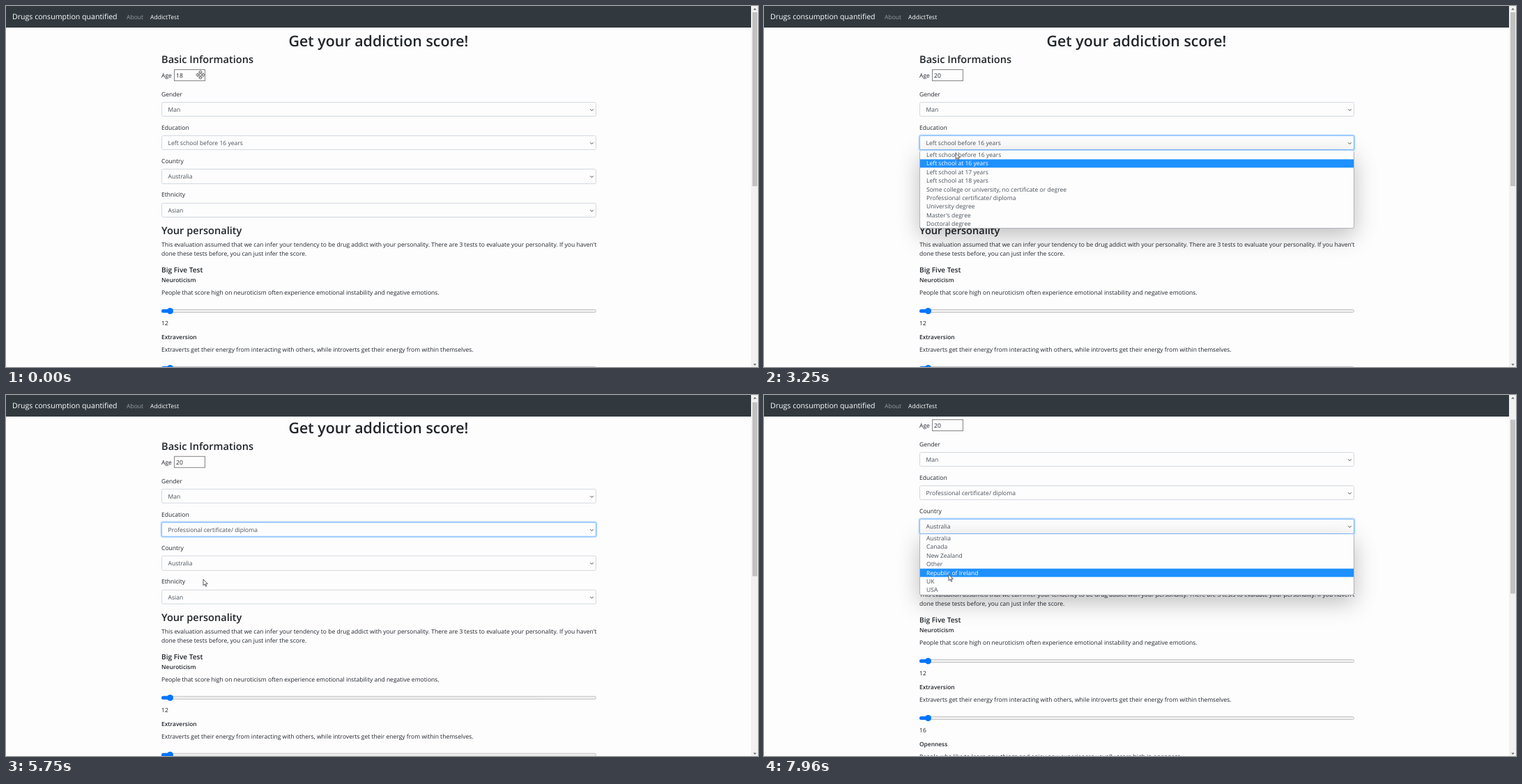
Write an HTML page that moves like this. It is 1079 px wide and 519 px high and loops after 8 s.

```html
<!DOCTYPE html>
<html lang="en">
<head>
<meta charset="utf-8">
<title>Addiction score</title>
<style>
@property --row { syntax: "<integer>"; inherits: true; initial-value: 0; }
html, body { margin: 0; width: 100%; height: 100%; overflow: hidden; }
body {
  position: relative; background: #fdfdfe; color: #212529;
  font: 8.55px/14px "Open Sans", "Noto Sans", sans-serif;
  text-rendering: geometricPrecision;
}
body *, body *::before, body *::after { position: absolute; box-sizing: border-box; white-space: pre; }

/* every animation shares one 8 s clock */
.anim { animation: 8s step-end infinite; }
#page { inset: 0; animation-name: scroll; }
#page > p { left: 223px; margin: -7px 0 0; }
#page > h1, #page > h2, #page > h3, #page > h4 { left: 223px; margin: -15px 0 0; line-height: 30px; font-weight: 600; }
#page > h1 { left: 0; width: 1069px; text-align: center; font-size: 21.4px; }
#page > h2 { font-size: 14.6px; }
#page > h3 { font-size: 10.1px; }
#page > h4 { font-size: 8.4px; }

#nav { left: 0; top: 0; width: 1069px; height: 30.5px; background: #31393f; color: #fff; }
#nav span { top: 8.5px; }
#nav .brand { left: 9px; font-size: 10.6px; }

#age { left: 241px; top: 91px; width: 45px; height: 17px; border: 1px solid #858585; background: #fdfdfe; }
#age span { left: 2px; top: .5px; }
.select { left: 223px; width: 624px; height: 21.5px; margin-top: -10.5px; border: 1px solid #d3d8dd; border-radius: 2.5px; background: #fdfdfe; color: #495057; }
.select span { left: 8.5px; top: 3px; }
.select svg { right: 2.5px; top: 8px; }
.slider { left: 223px; width: 624px; height: 5px; margin-top: -2.5px; border: 1px solid #c2c2c2; border-radius: 3px; background: #efefef; }
.slider::before { left: -1px; top: -1px; width: 12px; height: 5px; border-radius: 3px; background: #0075ff; content: ""; }
.slider::after { left: 6.5px; top: -3px; width: 9px; height: 9px; border-radius: 50%; background: #0075ff; content: ""; }

.list { left: 223px; width: 624px; border: 1px solid #b0b3b7; border-top: 0; border-radius: 3px; opacity: 0; box-shadow: 0 10px 32px rgba(0,0,0,.25); color: #495057; }
.rows { inset: 0; overflow: hidden; border-radius: 2px; background: #fdfdfe; line-height: 12.4px; }
.rows div { left: 9px; }
.rows .bar { left: 0; width: 100%; height: 12.4px; overflow: hidden; background: #1e90ff; color: #fff; transform: translateY(calc(var(--row) * 12.4px)); }
.bar > span { left: 0; top: 0; width: 100%; transform: translateY(calc(var(--row) * -12.4px)); }
#degrees { top: 208px; height: 111.5px; animation-name: showDegrees, rowDegrees; }
#degrees .rows { animation-name: paintDegrees; }
#lands { top: 200px; height: 87.5px; animation-name: showLands, rowLands; }
#lands .rows { animation-name: paintLands; }

#track { left: 1069px; top: 0; width: 10px; height: 519px; background: #f1f1f1; }
#thumb { left: 2px; top: 9px; width: 7px; height: 250px; background: #c1c1c1; animation-name: thumb; }
#track svg { left: 1px; top: 0; }
#cross { left: 272px; top: 92px; animation-name: cross; }
#arrow { left: 0; top: 0; overflow: visible; animation-name: arrow, showArrow; animation-timing-function: ease-in-out, step-end; }

#a18 { animation-name: a18; } #a19 { animation-name: a19; } #a20 { animation-name: a20; }
#before { animation-name: before; } #after { animation-name: after; }
#edu { animation-name: focusEdu; } #country { animation-name: focusCountry; }

@keyframes a18 { 0% { opacity: 1 } 13%, 100% { opacity: 0 } }
@keyframes a19 { 0% { opacity: 0 } 13% { opacity: 1 } 18.25%, 100% { opacity: 0 } }
@keyframes a20 { 0% { opacity: 0 } 18.25%, 100% { opacity: 1 } }
@keyframes before { 0% { opacity: 1 } 59.4%, 100% { opacity: 0 } }
@keyframes after { 0% { opacity: 0 } 59.4%, 100% { opacity: 1 } }
@keyframes focusEdu {
  0% { border-color: #d3d8dd; box-shadow: 0 0 0 2px rgba(0,123,255,0) }
  34.3% { border-color: #b9c0e2; box-shadow: 0 0 0 2px rgba(0,123,255,.03) }
  36%, 81% { border-color: #80bdff; box-shadow: 0 0 0 1.5px rgba(0,123,255,.25) }
  81.5%, 100% { border-color: #d3d8dd; box-shadow: 0 0 0 2px rgba(0,123,255,0) }
}
@keyframes focusCountry {
  0% { border-color: #d3d8dd; box-shadow: 0 0 0 2px rgba(0,123,255,0) }
  81.5%, 100% { border-color: #80bdff; box-shadow: 0 0 0 1.5px rgba(0,123,255,.25) }
}
@keyframes showDegrees { 0% { opacity: 0 } 34.3% { opacity: 1 } 59.4%, 100% { opacity: 0 } }
@keyframes paintDegrees { 0% { opacity: 0 } 36%, 100% { opacity: 1 } }
@keyframes rowDegrees {
  0% { --row: 0 } 40.5% { --row: 1 } 42% { --row: 2 } 43.5% { --row: 3 }
  45.5% { --row: 4 } 47.4%, 100% { --row: 5 }
}
@keyframes showLands { 0% { opacity: 0 } 81.5%, 100% { opacity: 1 } }
@keyframes paintLands { 0% { opacity: 0 } 82.5%, 100% { opacity: 1 } }
@keyframes rowLands {
  0% { --row: 0 } 84.5% { --row: 1 } 85.7% { --row: 2 } 86.8% { --row: 3 } 94%, 100% { --row: 4 }
}
@keyframes scroll {
  0% { transform: none }
  71.5% { transform: none; animation-timing-function: ease-in-out }
  73.8%, 100% { transform: translateY(-56px) }
}
@keyframes thumb {
  0% { transform: none }
  71.5% { transform: none; animation-timing-function: ease-in-out }
  73.8%, 100% { transform: translateY(26.5px) }
}
@keyframes cross { 0% { opacity: 1 } 20.9%, 100% { opacity: 0 } }
@keyframes showArrow { 0% { opacity: 0 } 20.9%, 100% { opacity: 1 } }
@keyframes arrow {
  0%, 20.9% { transform: translate(279px, 97px) }
  25%, 27.2% { transform: translate(275px, 187px) }
  32%, 37.5% { transform: translate(273px, 193px) }
  47.4%, 50% { transform: translate(283px, 280.5px) }
  57%, 70.4% { transform: translate(284.5px, 274px) }
  77%, 82% { transform: translate(270px, 187px) }
  87%, 91.2% { transform: translate(268px, 235px) }
  97%, 100% { transform: translate(265px, 258px) }
}
</style>
</head>
<body>
<div id="page" class="anim">
  <h1 style="top:50.6px">Get your addiction score!</h1>
  <h2 style="top:77.4px">Basic Informations</h2>
  <p style="top:99.5px">Age</p>
  <div id="age"><span id="a18" class="anim">18</span><span id="a19" class="anim">19</span><span id="a20" class="anim">20</span></div>
  <p style="top:126.5px">Gender</p>
  <div class="select" style="top:148px"><span>Man</span></div>
  <p style="top:174.7px">Education</p>
  <div class="select anim" id="edu" style="top:196.3px"><span id="before" class="anim">Left school before 16 years</span><span id="after" class="anim">Professional certificate/ diploma</span></div>
  <p style="top:223px">Country</p>
  <div class="select anim" id="country" style="top:244.7px"><span>Australia</span></div>
  <p style="top:271.3px">Ethnicity</p>
  <div class="select" style="top:293px"><span>Asian</span></div>
  <h2 style="top:323px">Your personality</h2>
  <p style="top:342.7px">This evaluation assumed that we can infer your tendency to be drug addict with your personality. There are 3 tests to evaluate your personality. If you haven't</p>
  <p style="top:356.3px">done these tests before, you can just infer the score.</p>
  <h3 style="top:379px">Big Five Test</h3>
  <h4 style="top:395.3px">Neuroticism</h4>
  <p style="top:411.7px">People that score high on neuroticism often experience emotional instability and negative emotions.</p>
  <div class="slider" style="top:438px"></div>
  <p style="top:455.5px">12</p>
  <h4 style="top:477px">Extraversion</h4>
  <p style="top:493.7px">Extraverts get their energy from interacting with others, while introverts get their energy from within themselves.</p>
  <div class="slider" style="top:520px"></div>
  <p style="top:537.5px">16</p>
  <h4 style="top:559px">Openness</h4>
  <p style="top:575.5px">People who like to learn new things and enjoy new experiences usually score high in openness.</p>
</div>

<div id="degrees" class="list anim" data-rows="Left school before 16 years|Left school at 16 years|Left school at 17 years|Left school at 18 years|Some college or university, no certificate or degree|Professional certificate/ diploma|University degree|Master's degree|Doctoral degree"></div>
<div id="lands" class="list anim" data-rows="Australia|Canada|New Zealand|Other|Republic of Ireland|UK|USA"></div>

<div id="nav">
  <span class="brand">Drugs consumption quantified</span>
  <span style="left:173px;color:#989c9f">About</span>
  <span style="left:207px">AddictTest</span>
</div>
<div id="track">
  <div id="thumb" class="anim"></div>
  <svg width="9" height="519" fill="#606468"><path d="M2.2 5.5h4.6L4.5 3zM2.2 514.5h4.6L4.5 517z"/></svg>
</div>
<svg id="cross" class="anim" width="14" height="14" viewBox="-7 -7 14 14" fill="#fff" stroke="#333" stroke-width=".8"><path d="M0-6.3 2.4-3.8H.9V-.9H3.8V-2.4L6.3 0 3.8 2.4V.9H.9V3.8H2.4L0 6.3-2.4 3.8H-.9V.9H-3.8V2.4L-6.3 0-3.8-2.4V-.9H-.9V-3.8H-2.4z"/></svg>
<svg id="arrow" class="anim" width="8" height="12" fill="#fff" stroke="#333" stroke-width=".8"><path d="M0 0V8.8L2.1 6.9 3.5 10.2 4.9 9.6 3.5 6.4H6.3z"/></svg>

<script>
const chevron = '<svg width="7" height="6" fill="none" stroke="#444"><path d="M1.3 1.3 3.5 3.5 5.7 1.3"/></svg>';
for (const box of document.querySelectorAll('.select')) box.insertAdjacentHTML('beforeend', chevron);

for (const list of document.querySelectorAll('.list')) {
  const rows = list.dataset.rows.split('|')
    .map((text, i) => `<div style="top:${i * 12.4}px">${text}</div>`).join('');
  list.innerHTML = `<div class="rows anim">${rows}<div class="bar"><span>${rows}</span></div></div>`;
}
</script>
</body>
</html>
```
